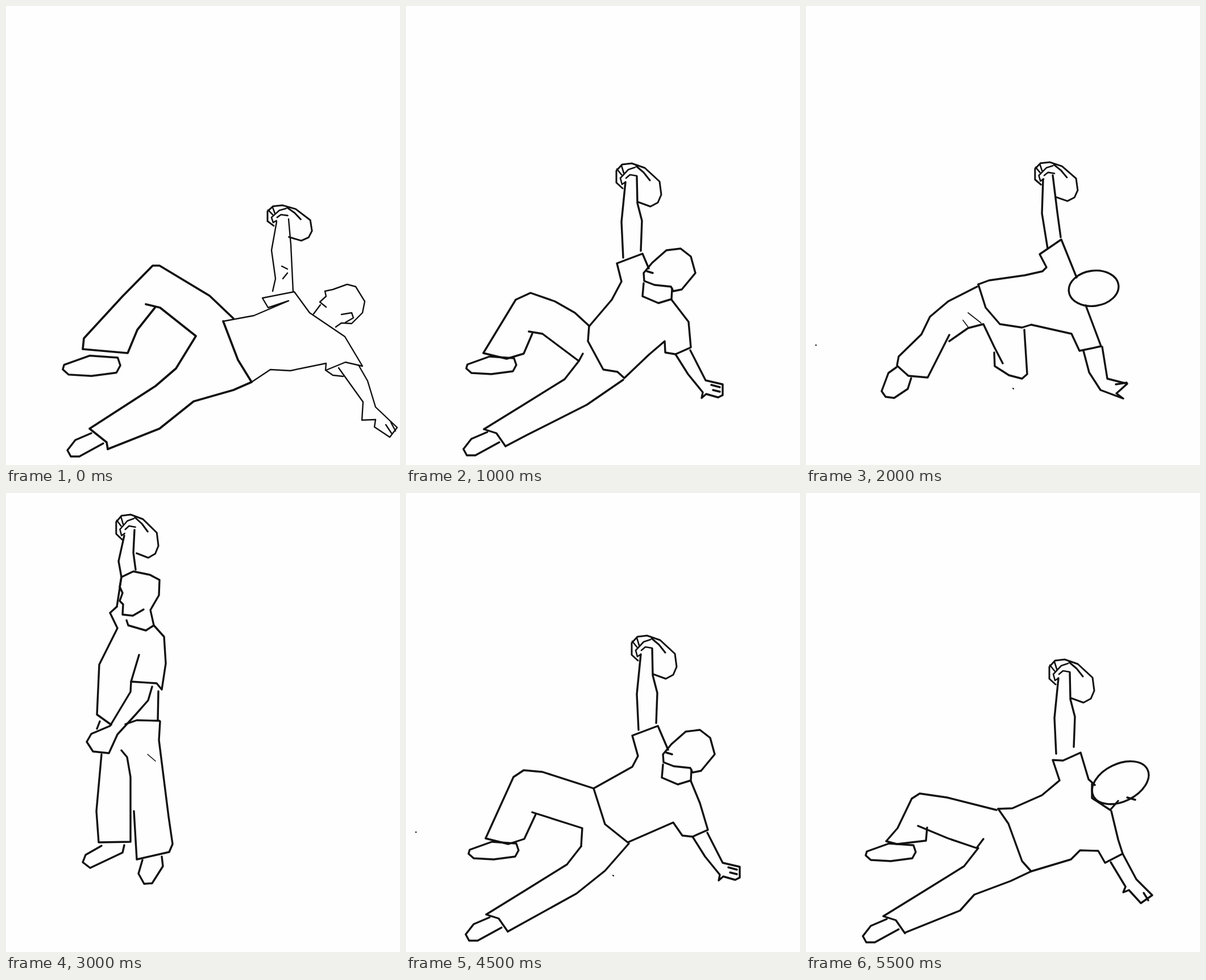
An HTML page for the animation above (6 s loop, 693 px wide and 808 px high).

```html
<!DOCTYPE html>
<html lang="en">
<head>
<meta charset="utf-8">
<title>Get-up exercise</title>
<style>
html, body { margin: 0; width: 100%; height: 100%; overflow: hidden; background: #fefefe; }
svg { display: block; width: 100%; height: 100%; }
path, ellipse { fill: none; stroke: #111; stroke-linecap: round; stroke-linejoin: round; }
</style>
</head>
<body>
<svg id="stage" viewBox="0 0 693 808"></svg>
<script>
const stage = document.getElementById("stage");
const PEN = 3.4, FINE = 2.4;
let group;

function add(tag, attrs, parent) {
  const el = document.createElementNS(stage.namespaceURI, tag);
  for (const key in attrs) el.setAttribute(key, attrs[key]);
  return parent.appendChild(el);
}

// Strokes are runs of x,y points, split by "|"; they can be moved and scaled.
function ink(width, strokes, dx = 0, dy = 0, sx = 1, sy = 1) {
  const d = strokes.split("|").map(s => "M" + s).join("")
    .replace(/(\d+),(\d+)/g, (_, x, y) => (x * sx + dx) + "," + (y * sy + dy));
  add("path", { d, "stroke-width": width }, group);
}

function oval(cx, cy, rx, ry, tilt) {
  add("ellipse", { cx, cy, rx, ry, transform: `rotate(${tilt} ${cx} ${cy})`, "stroke-width": PEN }, group);
}

// Parts shared by several poses
const shoe = "147,617 108,631 106,638 115,646 150,648 188,643 194,632 190,620z";
const toe = "143,750 115,762 101,780 107,791 122,791 164,768";
const shin = "304,625 279,657 205,703 137,745 159,752 175,775";
const bell = "14,45 3,35 3,14 13,3 30,1 53,9 79,33 82,56 76,70 63,77 41,69|38,6 51,17 62,31";
const fist = "19,34 13,38 10,27 24,12 36,8|4,11 12,21|12,5 16,18|20,27 27,21 39,23";
const raised = "15,167 12,104 19,34|46,155 48,102 40,71 39,24";
const propped = "474,613 496,648 522,680 520,690 528,683 549,689 557,685 557,666 527,659 500,606|537,667 552,671|540,676 552,679";
const foot = "159,636 145,646 133,678 140,688 155,690 179,674 185,655";

function weight(x, y, sx, sy) {
  ink(3, bell, x, y, sx, sy);
  ink(2.6, fist, x, y, sx, sy);
}

function lift(x, y, sx, sy) {
  weight(x, y, sx, sy);
  ink(PEN, raised, x, y, sx, sy);
}

function feet(dx, dy) {
  for (const part of [shoe, toe, shin]) ink(PEN, part, dx, dy);
}

function profile(dx, dy) {
  ink(PEN, "466,494 470,502 485,499 509,470 501,441 483,427 458,430 433,452 418,470 419,484 437,491z|424,467 434,470", dx, dy);
  ink(PEN, "418,488 416,511 444,523 467,516 468,497", dx, dy);
}

function specks() {
  ink(2, "17,597 18,597|364,673 365,674");
}

function lying() {
  ink(3.7, "400,550 358,510 270,457 258,457 205,511 137,585 135,604 214,611 231,570 262,531");
  ink(3.7, "246,525 271,531 334,581 299,638 263,669 147,744 177,768 179,780");
  ink(3.7, "179,780 270,744 330,696 400,676 432,662 408,623 382,555");
  ink(PEN, shoe, -22, -94, 1.15, 1.15);
  ink(PEN, toe, 7, 2);
  ink(FINE, "382,555 436,545 497,519 461,531 451,514 507,503 534,540 596,582 627,634 597,627 563,641");
  ink(FINE, "432,662 465,640 500,642 563,629 562,641 575,650 593,652");
  ink(FINE, "585,637 628,697 626,729 650,728 648,741 675,759 688,742 650,706 636,660 620,632");
  ink(FINE, "668,737 678,752|677,733 685,748");
  ink(FINE, "469,502 474,480 467,430 476,380|505,503 501,420 497,375|485,458 495,463|495,470 487,480");
  weight(457, 350, .99, .82);
  ink(FINE, "580,565 590,558 608,559 627,540 631,520 615,494 600,490 575,499 561,502 563,511 552,521 563,530");
  ink(FINE, "553,526 541,542|590,543 608,540 611,549 597,557");
}

function rising() {
  ink(PEN, "335,558 248,536 200,529 186,538 161,590 141,613 160,618 211,612 213,589");
  ink(PEN, "197,586 250,608 300,625 312,609");
  feet(-1, 0);
  ink(PEN, "174,774 271,735 296,707 360,683 396,666 380,648 356,582 338,556");
  ink(PEN, "338,556 363,555 415,532 446,506 434,470 452,471 483,457 497,504 508,514");
  ink(PEN, "396,666 466,645 482,629 514,630 526,651 557,635 549,610 537,560");
  ink(PEN, "536,650 562,693 558,703 568,699 589,722 609,708 581,680 557,635|594,704 602,717");
  lift(425, 292);
  oval(553, 510, 53, 33, -26);
  ink(PEN, "503,512 503,537 535,558 549,542|565,536 579,540");
}

function sitting() {
  ink(PEN, "322,563 297,540 262,520 219,505 193,517 136,611 177,621 207,612 222,577");
  ink(PEN, "216,573 240,577 304,625 311,612");
  feet(0, 0);
  ink(PEN, "175,775 213,755 318,702 382,658");
  ink(PEN, "322,564 362,517 379,485 371,453 416,436 427,462");
  ink(PEN, "322,564 320,590 347,640 372,644 384,655 427,614 455,590 456,610 474,613 501,601 497,556 467,517");
  ink(PEN, propped);
  lift(367, 276);
  profile(0, 0);
}

function bridging() {
  ink(PEN, "330,520 240,491 207,488 189,500 140,608 180,618 208,609 228,566");
  ink(PEN, "222,562 310,590 308,622");
  feet(4, -3);
  ink(PEN, "179,772 300,705 350,665 392,617");
  ink(PEN, "330,520 398,482 408,463 398,427 443,410 461,452");
  ink(PEN, "330,520 350,583 390,615 470,580 486,603 504,605 531,593 517,546 501,507");
  ink(PEN, propped, 30, -8);
  lift(394, 250);
  profile(34, -10);
  specks();
}

function bent() {
  ink(PEN, "301,494 250,520 218,547 203,578 163,617 160,633 180,651 214,654 252,579");
  ink(PEN, "252,590 285,567 312,560 331,600 346,629|331,610 332,634 357,650 380,656 389,648 384,570");
  ink(PEN, foot);
  ink(PEN, "303,490 322,483 385,474 416,467 423,460 411,437 449,411 476,478");
  ink(PEN, "303,490 316,531 341,560 380,566 396,561 467,577 481,607 519,599 492,527");
  ink(PEN, "488,607 498,645 518,676 558,691 546,682 565,665 530,656 521,600|545,666 564,663");
  ink(PEN, "425,427 415,365 417,305|448,407 442,363 434,298");
  weight(400, 274, .95, .9);
  oval(506, 497, 44, 31, -8);
  ink(1.6, "285,540 308,558|276,553 285,565");
  specks();
}

// Upright trunk, head and arms
function trunk(dx, dy) {
  const at = strokes => ink(PEN, strokes, dx, dy);
  at("195,200 183,211 196,238 164,302 160,390 185,408");
  at("260,233 278,253 281,300 274,346 265,335 220,332 234,285");
  at("268,349 267,400|210,407 230,400 270,401");
  at("220,332 219,350 183,410 150,424 142,438 153,455 181,458 196,425 228,390 250,365 257,341|165,402 160,415");
  at("208,75 198,120 203,148 195,200|226,65 224,105 228,135");
  at("212,224 215,233 246,242 260,233 254,206 269,180 270,153 253,144 224,138 203,148");
  at("203,148 200,165 205,176 200,190 206,196 205,214 223,216 242,205");
  weight(191 + dx, 37 + dy, .94, 1);
}

function kneeling() {
  trunk(103, 164);
  ink(PEN, "266,566 204,544 184,556 160,634 180,651 214,654 235,598");
  ink(PEN, "235,600 298,592 314,648 330,657 372,659 405,655 408,645 386,638 374,566");
  ink(PEN, foot, -4, 5);
  specks();
}

function standing() {
  trunk(0, 0);
  ink(PEN, "271,402 269,435 286,570 293,618 287,632 230,645 225,560");
  ink(PEN, "203,453 213,465 219,500 219,614 163,615 159,560 168,460");
  ink(PEN, "168,621 140,637 135,650 148,660 205,633 208,620");
  ink(PEN, "240,646 233,670 243,688 257,687 276,657 274,640");
  ink(1.6, "249,460 263,472");
}

const poses = [lying, rising, sitting, bridging, bent, kneeling, standing].map(pose => {
  group = add("g", { display: "none" }, stage);
  pose();
  return group;
});

const STEP = 500, COUNT = 12;
let shown = -1;

// Up through the poses, then back down.
function draw(t) {
  const step = Math.floor(t / STEP) % COUNT;
  const next = Math.min(step, COUNT - step);
  if (next === shown) return;
  poses.forEach((g, i) => g.setAttribute("display", i === next ? "inline" : "none"));
  shown = next;
}

const start = performance.now();
function tick() {
  draw(performance.now() - start);
  requestAnimationFrame(tick);
}
tick();
</script>
</body>
</html>
```
